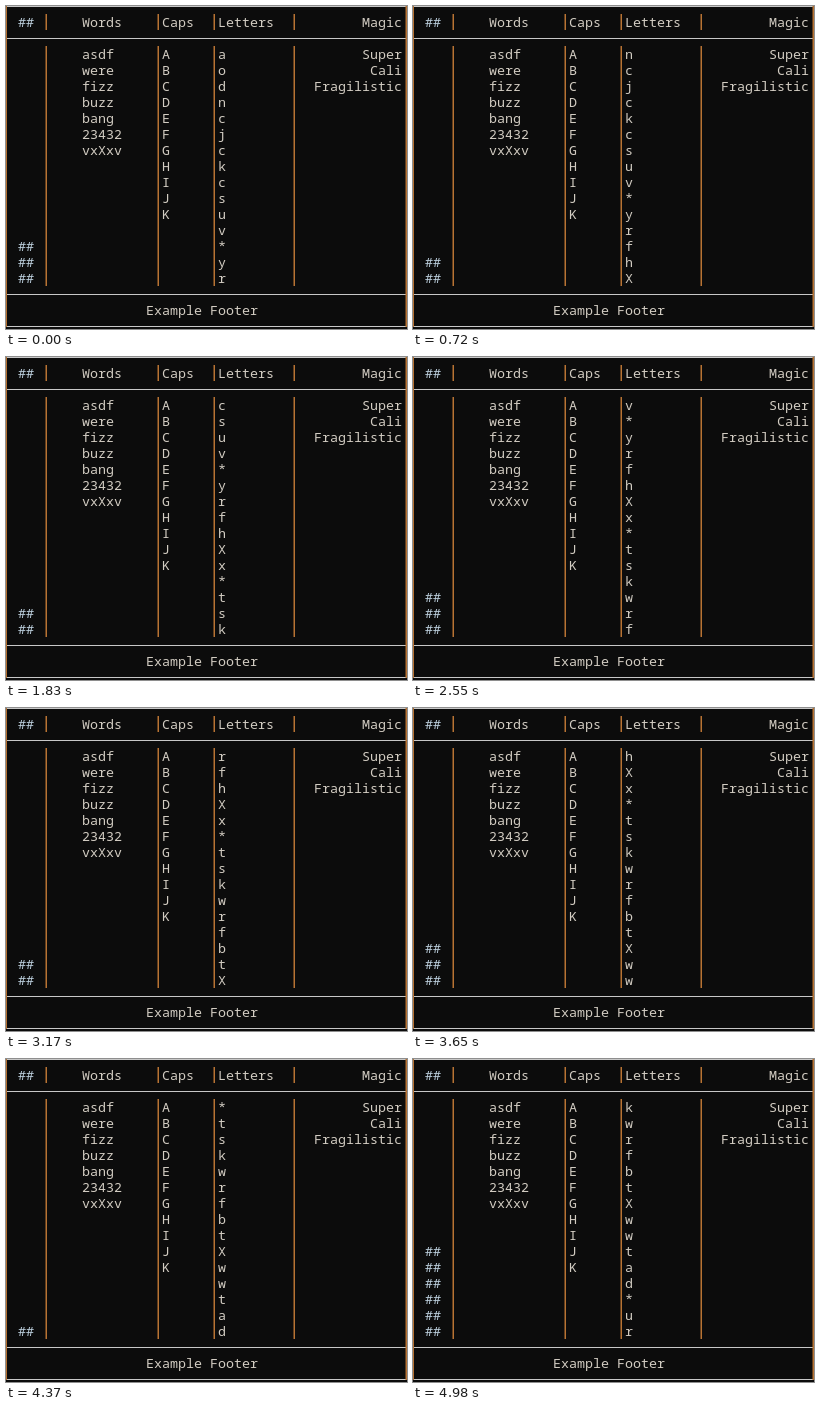
An HTML page that plays this animation: 401x323 px, repeating every 5.08 s.

```html
<!DOCTYPE html>
<html lang="en">
<head>
<meta charset="utf-8">
<title>Console table</title>
<style>
html, body { margin: 0; width: 100%; height: 100%; overflow: hidden; background: #0c0c0c; }
svg { display: block; }
text { font: 13.333px "Noto Sans Mono", "DejaVu Sans Mono", monospace; fill: #d2ccc2; white-space: pre; }
.hash { fill: #bccfdd; }
.bar { fill: #b87333; }
.rule { fill: #c8c8c8; }
</style>
</head>
<body>
<svg width="401" height="323"><g id="table"></g></svg>
<script>
const LOOP = 5080, ROWS = 15, BLANK = [4250, 4370];
const letters = "aodncjckcsuv*yrfhXx*tskwrfbtXwwtad*ur";
const hashCounts = "31423153241351243121346"; // stack height at each scroll step
const steps = [240, 480, 720, 970, 1230, 1350, 1590, 1830, 2070, 2310, 2550,
  2790, 2920, 3170, 3410, 3650, 3890, 4130, 4370, 4490, 4740, 4980];
const table = document.getElementById("table");

function add(tag, attrs, content = "") {
  const el = document.createElementNS("http://www.w3.org/2000/svg", tag);
  for (const name in attrs) el.setAttribute(name, attrs[name]);
  el.textContent = content;
  return table.appendChild(el);
}
const rule = y => add("rect", { class: "rule", x: 0, y, width: 401, height: 1 });
const bar = (x, y, height) => add("rect", { class: "bar", x: x - 0.5, y, width: 1.5, height });
const write = (content, x, row, cls = "") =>
  add("text", { x, y: 53 + 16 * row, class: cls }, content);
const column = (items, x) => [...items].map((item, row) => write(item, x, row));
const writeRight = (content, row) => write(content, 396 - 8 * content.length, row);

[0, 32, 288, 320].forEach(rule);
[0, 400].forEach(x => bar(x, 0, 321));
for (const x of [40, 152, 208, 288]) {
  bar(x, 8, 16);
  bar(x, 40, 240);
}

write("##", 12, -2, "hash");
write("Words", 76, -2);
write("Caps", 156, -2);
write("Letters", 212, -2);
writeRight("Magic", -2);
column(["asdf", "were", "fizz", "buzz", "bang", "23432", "vxXxv"], 76);
column("ABCDEFGHIJK", 156);
["Super", "Cali", "Fragilistic"].forEach(writeRight);
write("Example Footer", 140, 16);

const letterCells = column(letters.slice(0, ROWS), 212);
const hashCells = letterCells.map((_, row) => write("##", 12, row, "hash"));

let shown = -1;
function draw() {
  const t = performance.now() % LOOP;
  const step = steps.filter(time => time <= t).length;
  table.style.display = t >= BLANK[0] && t < BLANK[1] ? "none" : "";
  if (step !== shown) {
    shown = step;
    letterCells.forEach((cell, row) => cell.textContent = letters[step + row]);
    hashCells.forEach((cell, row) =>
      cell.style.display = row >= ROWS - hashCounts[step] ? "" : "none");
  }
  requestAnimationFrame(draw);
}
draw();
</script>
</body>
</html>
```
